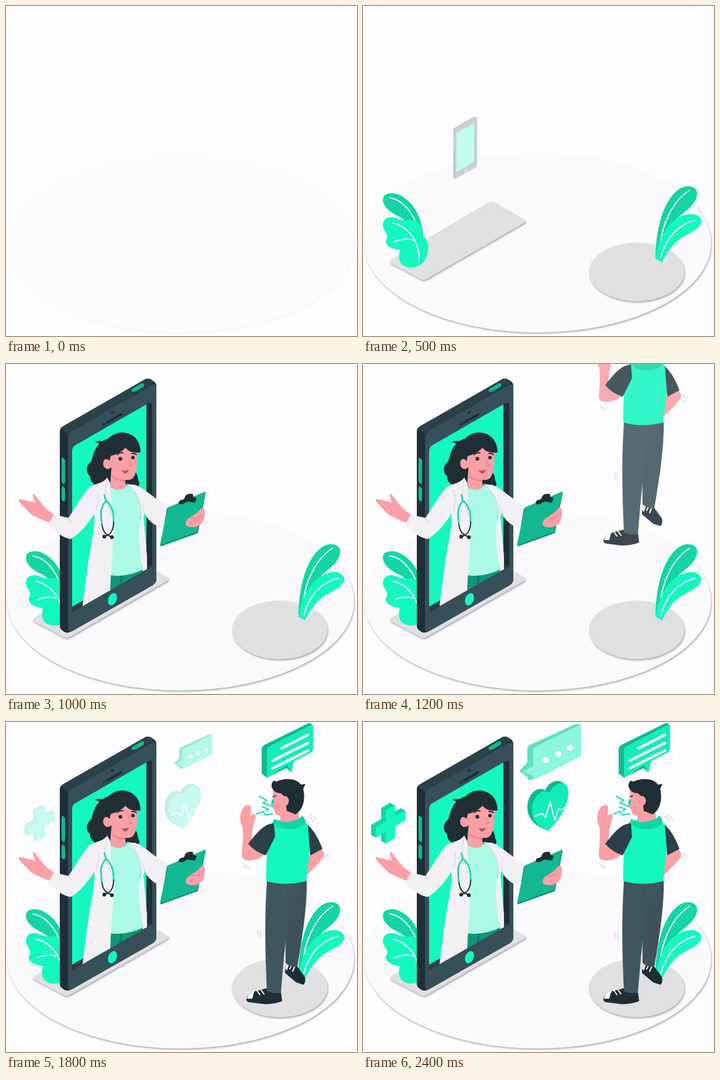
Write an HTML page that moves like this. It is 600 px wide and 564 px high and loops after 2500 ms.

```html
<!DOCTYPE html>
<html lang="en">
<head>
<meta charset="utf-8">
<title>Online consultation</title>
<style>
html, body { margin: 0; width: 100%; height: 100%; overflow: hidden; background: #fdfcff; }
svg { display: block; width: 600px; height: 564px; }
.cast { filter: drop-shadow(1.5px 2px 1.5px rgba(0,0,0,.33)); }
.mint { fill: #14f8c0; }
.bright { fill: #14edb8; }
.teal { fill: #13d6a4; }
.deep { fill: #12b891; }
.ink { fill: #1f2d34; }
.skin { fill: #fa9fa6; }
.coat { fill: #f2f0f3; }
.line { fill: none; stroke: #fff; stroke-width: 2; stroke-linecap: round; stroke-linejoin: round; }
.fold { fill: none; stroke: #d8d5da; stroke-width: 1.3; }
.dark { stroke: #1f2d34; }
.green { stroke: #14d9ac; }
</style>
</head>
<body>
<svg viewBox="0 0 600 564">
  <defs>
    <clipPath id="screen"><path d="M0 0H241V351L113 424H0Z"/></clipPath>
    <path id="heartShape" d="M319 121C325 105 351 94 351 120C351 148 332 170 317 186C303 181 289 170 289 150C289 126 308 112 319 121Z"/>
    <path id="crossShape" d="M39 151L55 142V161L73 151V168L55 178V198L39 208V188L22 198V180L39 170Z"/>
  </defs>

  <g id="floor"><ellipse class="cast" cx="298.500" cy="405.500" rx="296.500" ry="152.500" fill="#faf9fb"/></g>

  <g id="decor">
    <g class="cast" fill="#e0dfe1">
      <path d="M48 434L212 337Q219 333 226 337L276 365Q280 368 275 371L110 466Q103 470 97 466L48 440Q44 437 48 434Z"/>
      <ellipse cx="468" cy="454.500" rx="81.500" ry="50"/>
    </g>
    <path class="teal" d="M34 331C34 320 48 318 60 322C88 334 103 365 103 400L92 405C82 370 70 364 58 358C44 351 34 341 34 331Z"/>
    <path class="line" d="M46 328C72 332 92 362 97 394"/>
    <path class="mint" d="M34 373C36 358 52 359 60 364C72 369 85 363 95 370C102 378 100 386 101 393C111 398 114 411 110 422C108 439 94 448 79 447C63 444 59 434 63 417C48 416 37 408 39 400C47 391 33 383 34 373Z"/>
    <path class="line" d="M51 371C80 378 97 404 96 437M54 403Q70 396 85 400"/>
    <path class="teal" d="M500 431C500 385 512 333 540 313C555 303 574 309 571 323C568 344 544 353 530 371C516 389 512 412 510 437Z"/>
    <path class="line" d="M558 315C528 334 508 377 507 424"/>
    <path class="mint" d="M500 432C505 398 523 362 555 356C570 353 581 362 578 371C572 386 549 390 535 404C522 416 517 428 511 438Z"/>
    <path class="line" d="M568 366C538 373 517 398 509 430"/>
  </g>

  <g id="phone">
    <path fill="#1e2f37" d="M92 115Q92 109 98 106L238 26Q243 24 247 26L252 29Q257 32 257 38V368Q257 374 251 378L114 456Q106 461 100 458L96 455Q92 452 92 447Z"/>
    <path fill="#2b424b" d="M93 110L238 26Q243 24 247 26L254 31L112 115L106 120Z"/>
    <path fill="#374f59" d="M106 127Q106 119 112 115L246 37Q257 31 257 41V368Q257 374 251 378L116 455Q106 461 106 451Z"/>
    <path fill="#1e2f37" d="M113 149Q113 142 118 139L244 67Q250 64 250 70V346L113 424Z"/>
    <path class="mint" d="M113 149Q113 142 118 139L240 69V342L113 415Z"/>
    <path fill="#2a3e47" d="M113 415L240 342L250 346L113 424Z"/>
    <g class="deep">
      <path d="M95 163Q95 159 98 161L101 164V202Q100 207 97 204L95 201ZM95 212Q95 208 98 210L101 213V232Q100 237 97 234L95 231Z"/>
      <path d="M215 43L230 34Q237 31 236 37L235 39L221 47Q213 49 215 43Z"/>
    </g>
    <path class="line dark" d="M173 100L197 86" style="stroke-width:4"/>
    <g class="ink"><circle cx="167" cy="103" r="2.200"/><circle cx="181.500" cy="83" r="2.300"/></g>
    <ellipse class="mint" cx="182" cy="402" rx="7.200" ry="11" transform="rotate(22 182 402)"/>
  </g>

  <g id="doctor">
    <path class="ink" d="M172 128C152 136 149 156 146 166C134 176 138 187 144 192C143 205 157 212 178 206L207 206C216 212 229 213 228 203C224 197 227 190 220 184L210 150Z"/>
    <g clip-path="url(#screen)">
      <path fill="#11967a" d="M177 350L236 340V370L177 400Z"/>
      <path fill="#0f7d67" d="M196 358L201 357L196 385H193Z"/>
      <path fill="#abfbe4" d="M174 213L212 208C231 220 235 237 229 265L233 352Q205 365 178 361Z"/>
      <path class="coat" d="M206 205L222 207C239 218 242 235 235 262L243 350L234 354C228 310 224 285 231 262C234 235 224 219 206 205Z"/>
      <path class="coat" d="M173 194C167 204 150 205 142 211L150 252C155 272 145 305 139 350L130 420L178 395C179 340 187 295 182 260C181 238 177 218 180 207Z"/>
    </g>
    <path class="coat" d="M142 211C128 228 117 248 107 263L80 257L72 276C86 288 99 298 111 299C127 289 144 270 154 250L160 214Z"/>
    <path class="coat" d="M218 206C238 211 252 231 278 243L267 280C249 275 237 262 232 240Z"/>
    <path class="fold" d="M154 250Q160 232 157 220M173 198C165 215 174 239 180 260M207 205C222 216 233 236 230 262M107 263L112 270M233 240Q235 257 247 268"/>
    <path class="skin" d="M82 257C67 249 59 236 50 224Q45 219 46 227L50 237C42 235 32 232 24 231Q19 232 24 237L43 257C56 264 65 268 74 271Z"/>
    <path class="skin" d="M180 181L178 208Q190 221 205 211L203 192Z"/>
    <path fill="#ed8791" d="M182 189Q190 199 203 197V201Q188 200 182 194Z"/>
    <path class="skin" d="M177 157L195 139L226 148C224 165 226 184 217 195C208 203 188 195 181 184Z"/>
    <ellipse class="skin" cx="174" cy="170" rx="8" ry="9.500"/>
    <path class="ink" d="M166 165C156 142 176 117 199 117C218 118 230 131 230 151C219 153 210 150 204 143C197 152 184 156 179 157L177 166Q172 159 166 165ZM152 133Q160 129 169 134L162 140Q160 135 152 133Z"/>
    <g class="ink"><circle cx="195.500" cy="162" r="3.200"/><circle cx="217" cy="160" r="3"/></g>
    <path class="line dark" d="M190 155Q194 150 200 152M215 153Q219 152 223 155"/>
    <path d="M210 163L215 173L209 174" fill="none" stroke="#e77784" stroke-width="1.300"/>
    <path fill="#b64e60" d="M197 181Q204 184 210 180Q208 188 202 187Z"/>
    <path class="line green" d="M170 235C160 246 162 258 164 275M173 235C183 246 184 258 184 270M171 235L168 224" style="stroke-width:2.700"/>
    <path class="line dark" d="M164 275Q166 289 175 293L181 296M184 270Q184 286 175 292L168 295"/>
    <g class="ink"><circle cx="168" cy="295" r="3.200"/><circle cx="181" cy="296" r="3.200"/></g>
    <path fill="#0d8a70" d="M275 247L341 218V222L328 289L264 312Z"/>
    <path class="deep" d="M277 245L341 218L327 287L263 310Z"/>
    <path class="ink" d="M295 239Q295 232 302 232L305 230Q307 221 315 222Q321 221 320 227L326 229L323 237L310 235L301 240Z"/>
    <path class="skin" d="M307 271C310 262 321 260 331 250Q337 242 339 247C341 257 340 267 333 274C325 281 312 280 307 275Z"/>
    <path d="M314 262Q325 265 333 259" fill="none" stroke="#e77784"/>
  </g>

  <g id="man">
    <path class="skin" d="M403 226C405 208 406 190 404 179C398 168 400 151 408 144Q416 139 419 146L418 160L424 157Q429 158 425 168L421 186C421 197 418 207 416 211L444 225C435 233 421 239 410 236Q403 234 403 226Z"/>
    <path class="skin" d="M538 217Q548 225 541 233C531 246 522 255 512 263V232L522 226Z"/>
    <g class="ink">
      <path d="M411 473Q414 463 426 460L446 455L470 461L472 477Q458 483 440 482L416 479Q410 478 411 473Z"/>
      <path d="M477 420Q479 412 489 413L498 418L511 436Q513 446 508 449L496 445L477 429Z"/>
    </g>
    <path fill="#fff" d="M412 473Q414 463 425 460Q422 466 421 473ZM477 421Q478 415 484 414L480 425Z"/>
    <path class="line" d="M429 459L434 466M436 458L441 465M488 416L485 422M493 419L490 426"/>
    <path fill="#3d525b" d="M478 275L514 271C515 310 508 360 498 418Q487 419 478 412C477 380 478 335 484 300Z"/>
    <path fill="#40565f" d="M446 272L509 274Q503 296 487 303C481 340 475 400 470 463Q457 465 446 460C444 410 441 350 446 272Z"/>
    <path d="M488 303Q481 299 481 289" fill="none" stroke="#2e434c"/>
    <path class="mint" d="M457 168L447 194C447 220 444 247 445 272Q479 281 513 272L519 222L518 177L507 167Z"/>
    <path fill="#2c4049" d="M458 173C441 174 430 188 414 208Q424 221 444 228L460 196ZM516 176C528 187 536 203 541 217L520 228Z"/>
    <path class="skin" d="M469 150H500L501 171Q485 178 469 168Z"/>
    <path class="skin" d="M456 116L474 114L487 148L478 162Q464 161 460 156L457 147L453 140L457 132Z"/>
    <path class="teal" d="M458 165Q471 175 489 169Q503 166 506 160Q514 166 511 175Q498 186 474 182Q456 178 458 165Z"/>
    <path class="ink" d="M470 122Q458 122 454 111Q453 104 458 100L462 102C476 95 497 96 504 107L512 106L508 114C512 131 509 149 495 158L480 152L477 128Z"/>
    <ellipse class="skin" cx="477" cy="135" rx="6.500" ry="8.500"/>
    <path class="line dark" d="M456 128L461 126" style="stroke-width:1.500"/>
    <path class="fold" d="M404 240Q407 247 416 247M407 245Q411 252 418 250M546 236Q555 233 556 226M543 231Q550 229 551 224M516 162Q524 164 525 171M519 158Q529 161 530 169M431 356Q429 362 433 370M435 357Q433 363 437 368"/>
  </g>

  <g id="cough">
    <path class="line green" d="M433 127L446 134L439 138L457 145M438 145L449 149L444 152M428 157L440 153L443 159L456 157"/>
    <path class="teal" d="M455 131L459 135L456 142L453 139Z"/>
  </g>

  <g id="speech">
    <path class="deep" d="M437 47Q437 42 442 39L515 3Q521 0 525 7L524 48L492 65L488 86L479 79L446 95L437 88Z"/>
    <path class="bright" d="M446 49Q446 44 451 41L519 6Q525 3 525 10V45Q525 50 520 53L492 67Q491 80 486 85L481 73L452 92Q446 96 446 89Z"/>
    <path class="line" d="M471 45L516 22M456 66L516 36M456 79L516 49" style="stroke-width:4.500"/>
  </g>

  <g id="chat">
    <path fill="#62dfc1" d="M281 45Q281 41 286 39L362 4Q369 1 373 7L291 98Q281 102 281 94L267 84L281 69Z"/>
    <path fill="#8df6dc" d="M291 49Q291 44 296 42L366 7Q373 4 373 11V53Q373 58 368 61L298 96Q291 100 291 93L274 84L291 76Z"/>
    <g fill="#fff"><circle cx="313" cy="65" r="5"/><circle cx="334" cy="54.500" r="5"/><circle cx="354" cy="44" r="5"/></g>
  </g>

  <g id="heart"><g class="deep"></g><use href="#heartShape" class="bright"/>
    <path class="line" d="M294 161L306 156L312 163L320 137L328 168L334 148L339 150L350 143"/></g>
  <g id="cross"><g class="teal"></g><use href="#crossShape" class="mint"/></g>
</svg>
<script>
const $ = id => document.getElementById(id);

// Thickness of the solid icons: copies stepped back from the front face.
for (const name of ['heart', 'cross']) {
  let copies = '';
  for (let i = 8; i > 0; i--) copies += `<use href="#${name}Shape" x="${-i}" y="${-i / 2}"/>`;
  $(name).querySelector('g').innerHTML = copies;
}

function pose(id, opacity, { x = 0, y = 0, scale = 1, cx = 0, cy = 0 } = {}) {
  const el = $(id);
  el.setAttribute('opacity', opacity);
  el.setAttribute('transform',
    `translate(${cx + x} ${cy + y}) scale(${scale}) translate(${-cx} ${-cy})`);
}

function draw(t) {
  const ramp = (from, to) => Math.min(1, Math.max(0, (t - from) / (to - from)));
  const zoom = (id, from, to, cx, cy) => {
    const p = ramp(from, to);
    pose(id, p, { scale: p, cx, cy });
  };
  const drift = (id, dx, cx, cy) => {
    const p = ramp(1700, 2150);
    pose(id, p, { x: dx * (1 - p), scale: .86 + .14 * p, cx, cy });
  };

  pose('floor', ramp(-30, 270));
  pose('decor', ramp(150, 450));
  zoom('phone', 435, 700, 174.5, 242);
  zoom('doctor', 735, 1000, 180, 270);
  pose('man', ramp(1000, 1230), { y: -344 * (1 - ramp(1000, 1400)) });
  pose('cough', ramp(1400, 1700));
  zoom('speech', 1400, 1700, 481, 48);
  zoom('chat', 1620, 1910, 320, 50);
  drift('heart', -18, 316, 144);
  drift('cross', 18, 43, 173);
}

const start = performance.now();
function tick() {
  const t = (performance.now() - start) % 2500;
  draw(Math.floor(t / 100) * 100);
  requestAnimationFrame(tick);
}
tick();
</script>
</body>
</html>
```
